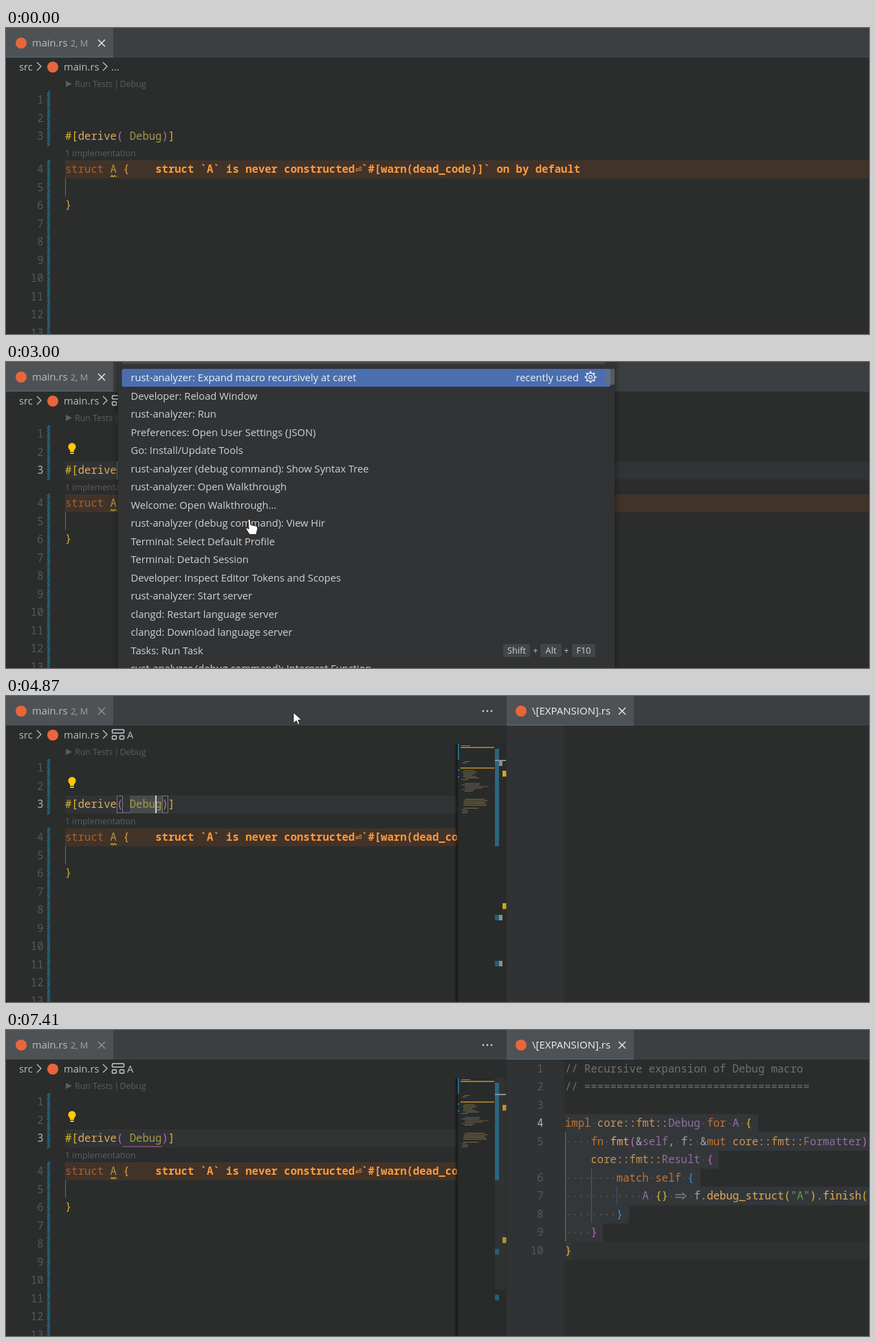
Animation of 1255 by 446 pixels, one loop 7.51 s. Source, as an HTML page with a canvas:

```html
<!DOCTYPE html>
<html lang="en">
<head>
<meta charset="utf-8">
<title>Macro expansion</title>
<style>
  html, body { margin: 0; width: 100%; height: 100%; overflow: hidden; background: #2b2d2d; }
  canvas { display: block; }
</style>
</head>
<body>
<canvas id="stage" width="1255" height="446"></canvas>
<script>
const ctx = document.getElementById('stage').getContext('2d');
const LOOP = 7510, CELL = 9.37, ROW = 26.5;
const T = { click: 1590, crumb: 1660, bulb: 1870, palette: 2920, hover: 3470, close: 4770,
            split: 4840, expand: 4910, blur: 5850, drag: 5910, leave: 6530, out: 6930, dim: 7260, inactive: 7410 };
const C = { key: '#c27332', dimKey: '#a5622f', path: '#c99557', type: '#8f6ea3', fn: '#dcaa5e', plain: '#98a4b0',
            gold: '#dcb82e', pink: '#c266c0', blue: '#3c91d8', comment: '#6f7172', string: '#6f9457',
            num: '#55595b', numOn: '#b0b3b4', ui: '#bcbfc0', olive: '#a39a45', brace: '#d9a441', warn: '#ff9a3c' };

const MOUSE = [[370, 515, 405], [1120, 222, 170], [1250, 257, 194], [1450, 219, 162], [1590, 219, 162],
  [1730, 354, 231], [3470, 354, 229], [3600, 407, 103], [3930, 409, 34], [4070, 409, 34], [4170, 418, 24],
  [5100, 418, 24], [5700, 916, 309], [5910, 916, 309], [6140, 735, 140], [6450, 735, 140], [6500, 731, 148], [6930, 590, 440]];

const PALETTE = ['rust-analyzer: Expand macro recursively at caret', 'Developer: Reload Window', 'rust-analyzer: Run',
  'Preferences: Open User Settings (JSON)', 'Go: Install/Update Tools', 'rust-analyzer (debug command): Show Syntax Tree',
  'rust-analyzer: Open Walkthrough', 'Welcome: Open Walkthrough...', 'rust-analyzer (debug command): View Hir',
  'Terminal: Select Default Profile', 'Terminal: Detach Session', 'Developer: Inspect Editor Tokens and Scopes',
  'rust-analyzer: Start server', 'clangd: Restart language server', 'clangd: Download language server',
  'Tasks: Run Task', 'rust-analyzer (debug command): Interpret Function'];

// Each row: line number, start column, then text and colour pairs.
const EXPANSION = [
  [1, 0, '// Recursive expansion of Debug macro', C.comment],
  [2, 0, '// ===================================', C.comment],
  [3, 0],
  [4, 0, 'impl ', C.key, 'core::fmt::', C.path, 'Debug ', C.type, 'for ', C.key, 'A ', C.type, '{', C.gold],
  [5, 0, '    fn ', C.key, 'fmt', C.fn, '(', C.pink, '&', C.plain, 'self', C.type, ', f: &', C.plain, 'mut ', C.key,
    'core::fmt::', C.path, 'Formatter', C.type, ')', C.pink],
  ['', 4, 'core::fmt::', C.path, 'Result ', C.type, '{', C.pink],
  [6, 0, '        match ', C.key, 'self ', C.key, '{', C.blue],
  [7, 0, '            A ', C.type, '{} ', C.gold, '=>', C.plain, ' f.', C.plain, 'debug_struct', C.fn, '(', C.gold,
    '"A"', C.string, ')', C.gold, '.', C.plain, 'finish', C.fn, '(', C.gold],
  [8, 0, '        }', C.blue],
  [9, 0, '    }', C.pink],
  [10, 0, '}', C.gold]
];
const SELECT_END = [1094, 1255, 1036, 1010, 1255, 906, 868, 822];

function rect(x, y, w, h, color, radius = 0) {
  ctx.fillStyle = color;
  ctx.beginPath();
  ctx.roundRect(x, y, w, h, radius);
  ctx.fill();
}
function line(points, color, width = 1) {
  ctx.strokeStyle = color;
  ctx.lineWidth = width;
  ctx.beginPath();
  for (let i = 0; i < points.length; i += 2) ctx.lineTo(points[i], points[i + 1]);
  ctx.stroke();
}
function dot(x, y, r, color) {
  ctx.fillStyle = color;
  ctx.beginPath();
  ctx.arc(x, y, r, 0, 7);
  ctx.fill();
}
function label(str, x, y, color = C.ui, size = 14.7, align = 'left') {
  ctx.font = `${size}px "Open Sans", sans-serif`;
  ctx.textAlign = align;
  ctx.fillStyle = color;
  ctx.fillText(str, x, y + 5);
}
function mono(str, x, y, color, align = 'left', weight = 300) {
  ctx.font = `${weight} 15.6px "Noto Sans Mono", "DejaVu Sans Mono", monospace`;
  ctx.textAlign = align;
  ctx.fillStyle = color;
  ctx.fillText(str, x, y + 5.3);
}
function code(x, y, spans, dots) {
  for (let i = 0; i < spans.length; i += 2) {
    const [str, color] = [spans[i], spans[i + 1]];
    if (str === '=>') {
      line([x + 1, y - 2, x + 14, y - 2], color);
      line([x + 1, y + 2, x + 14, y + 2], color);
      line([x + 11, y - 5, x + 17, y, x + 11, y + 5], color);
    } else mono(str, x, y, color);
    if (dots) [...str].forEach((ch, n) => ch === ' ' && rect(x + (n + .5) * CELL - 1, y - .5, 2, 2, dots, 1));
    x += str.length * CELL;
  }
}
function cross(x, y, color) {
  line([x - 5, y - 5, x + 5, y + 5], color, 1.4);
  line([x + 5, y - 5, x - 5, y + 5], color, 1.4);
}
function badge(x, y) { dot(x, y, 8, '#e8663c'); }
function gear(x, y) {
  ctx.strokeStyle = '#e3e7ee';
  ctx.lineWidth = 1.3;
  for (const r of [2.4, 6]) {
    ctx.beginPath();
    ctx.arc(x, y, r, 0, 7);
    ctx.stroke();
  }
  for (let a = 0; a < 8; a++) {
    const c = Math.cos(a * Math.PI / 4), s = Math.sin(a * Math.PI / 4);
    line([x + c * 6, y + s * 6, x + c * 8.5, y + s * 8.5], '#e3e7ee', 2.4);
  }
}

function mouseAt(t) {
  const i = MOUSE.findIndex(k => k[0] > t);
  if (i <= 0) return MOUSE[i ? MOUSE.length - 1 : 0].slice(1);
  const [t0, x0, y0] = MOUSE[i - 1], [t1, x1, y1] = MOUSE[i];
  const p = (t - t0) / (t1 - t0), e = p * p * (3 - 2 * p);
  return [x0 + (x1 - x0) * e, y0 + (y1 - y0) * e];
}

function tabsAndCrumbs(t) {
  const split = t >= T.split;
  rect(0, 0, 1255, 43, '#3c3f41');
  rect(0, 0, 156, 42, '#4e5254');
  rect(0, 42, 1255, 1, '#35454c');
  rect(0, 42, 156, 1, split ? '#3c5663' : '#3b7596');
  badge(22, 22);
  label('main.rs', 38, 22);
  label('2, M', 94, 22, '#a0a3a4', 12.8);
  cross(139, 22, split ? '#8d9192' : '#e8e8e8');

  label('src', 19, 57);
  line([45, 50, 51, 56, 45, 62], C.ui, 1.4);
  badge(68, 57);
  label('main.rs', 84, 57);
  line([141, 50, 147, 56, 141, 62], C.ui, 1.4);
  if (t < T.crumb) return label('...', 153, 57);
  ctx.strokeStyle = '#c8cacb';
  ctx.lineWidth = 1.5;
  ctx.beginPath();
  ctx.roundRect(154.5, 49, 17, 5, 1);
  ctx.roundRect(154.5, 58, 6, 5, 1);
  ctx.roundRect(165.5, 58, 6, 5, 1);
  ctx.stroke();
  label('A', 176, 57);
}

function mainEditor(t) {
  const clicked = t >= T.click, focused = clicked && t < T.blur;
  if (clicked) rect(86, 145, 1169, 26, '#313335');
  rect(86, 193, 1169, 26, '#423329');

  ctx.fillStyle = '#5c5f60';
  ctx.beginPath();
  ctx.moveTo(87, 77); ctx.lineTo(96, 81.5); ctx.lineTo(87, 86);
  ctx.fill();
  label('Run Tests', 100, 81, '#5c5f60', 12.4);
  label('|', 157.5, 81, '#5c5f60', 12.4);
  label('Debug', 165.5, 81, '#5c5f60', 12.4);
  label('1 implementation', 86, 182, '#5c5f60', 12.4);

  for (let n = 1; n <= 13; n++)
    mono(n, 54.5, n < 4 ? 105 + ROW * (n - 1) : 206 + ROW * (n - 4), n === 3 && clicked ? C.numOn : C.num, 'right');
  for (const [top, bottom] of [[92, 170], [192, 448]])
    for (let y = top; y < bottom; y += 3.2) line([60, y + 3.5, 64, y], '#1f88b0', 1.2);

  if (clicked) rect(170, 169.5, 57, 1, '#a761a8');
  if (focused) {
    if (t >= T.bulb) rect(180, 145, 47, 26, '#474c4b');
    ctx.strokeStyle = '#73786f';
    ctx.lineWidth = 1;
    ctx.strokeRect(161.5, 145.5, 8, 25);
    ctx.strokeRect(227.5, 145.5, 8, 25);
  }
  code(86, 158, ['#[', C.gold, 'derive', C.fn, '(', C.pink, ' Debug', C.olive, ')', C.pink, ']', C.gold]);
  code(86, 206, ['struct ', C.dimKey, 'A ', C.olive, '{', C.brace]);
  let x = 86 + 14 * CELL;
  for (const part of ['struct `A` is never constructed', '⏎', '`#[warn(dead_code)]` on by default']) {
    mono(part, x, 206, C.warn, 'left', 600);
    x += part.length * CELL;
  }
  line([152, 217, 154, 215, 156, 217, 158, 215, 161, 217], '#d0ae22', 1.3);
  rect(86, 219, 1, 26, '#77702a');
  mono('}', 86, 258, C.brace);

  if (t >= T.bulb) {
    dot(96, 123.5, 5.5, '#ffcc00');
    rect(93, 127, 6, 4, '#ffcc00');
    rect(93.5, 132, 5, 2, '#ffcc00');
  }
  const caret = (t >= T.click && t < 2070) || (t >= 2580 && t < T.palette) || (t >= T.close && t < T.expand);
  if (caret) rect(217, 145, 2, 26, '#c8c8c8');
}

function palette(t, my) {
  ctx.save();
  ctx.shadowColor = 'rgba(0,0,0,.45)';
  ctx.shadowBlur = 10;
  rect(163, -10, 722, 470, '#313335');
  ctx.restore();
  rect(169, 0, 702, 3, '#45494a');
  const hovered = t >= T.hover ? Math.floor((my - 10) / ROW) : 0;
  PALETTE.forEach((name, i) => {
    const y = 23 + i * ROW;
    if (i === 0 || i === hovered) {
      rect(168.5, y - 13, 710.5, 26, '#4b6eaf', 3);
      gear(850, y - 1);
    }
    label(name, 181.5, y, i === 0 ? '#eef1f6' : '#d0d2d3');
  });
  label('recently used', 833, 23, '#eef1f6', 14.7, 'right');
  rect(872, 10, 13, 23, 'rgba(105,112,122,.65)');
  for (const [key, x, w] of [['Shift', 723, 39], ['Alt', 777, 31], ['F10', 823, 34]]) {
    rect(x, 411, w, 19, '#41464a', 3);
    label(key, x + w / 2, 420, '#cfd1d2', 12.8, 'center');
  }
  for (const x of [770, 815]) label('+', x, 420, C.ui, 13, 'center');
}

function minimap(t) {
  rect(656, 70, 72, 376, '#292b2b');
  const edge = ctx.createLinearGradient(651, 0, 657, 0);
  edge.addColorStop(0, 'rgba(0,0,0,0)');
  edge.addColorStop(1, 'rgba(0,0,0,.5)');
  ctx.fillStyle = edge;
  ctx.fillRect(651, 70, 6, 376);
  rect(657, 70, 1.5, 23, '#2382aa');
  rect(662, 72, 13, 1, '#a08838');
  rect(661, 74, 49, 2, '#9c7a20');
  rect(661, 104, 49, 2, '#9c7a20');
  const random = n => Math.abs(Math.sin(n * 12.9898) * 43758.5453) % 1;
  const tones = ['#7c6a3c', '#68705e', '#74583c', '#666a6e'];
  for (const [top, bottom, width] of [[95, 99, 8], [108, 122, 20], [127, 139, 36], [150, 159, 38], [163, 171, 28]])
    for (let y = top; y < bottom; y += 2.2) {
      const indent = random(y) * 6;
      rect(662 + indent, y, 5 + random(y + 3) * (width - 5), 1, tones[Math.floor(random(y + 7) * 4)]);
    }
  for (const y of [107, 117]) rect(657, y, 2, 2, '#2382aa');

  if (t >= T.leave) rect(711, 70, 16, 308, '#303334');
  rect(711, 77, 6, 142, '#2b657f');
  for (const y of [319, 386]) rect(711, y, 6, 8, '#225f79');
  for (const y of [109, 302]) rect(722, y, 5.5, 8.5, t < T.dim ? '#d0aa12' : '#b5951a');
  rect(711, 93, 16, 2, '#8b8f90');
  if (t < T.blur) for (const y of [94, 319, 386]) rect(717, y, 5, 8, '#8a8e8f');
}

function expansionPane(t, mx, my) {
  rect(728, 43, 527, 403, '#2b2d2d');
  rect(728, 43, 84, 403, '#303234');
  rect(728, 0, 185, 42, '#4e5254');
  rect(728, 42, 185, 1, '#3b7596');
  badge(749, 22);
  label('\\[EXPANSION].rs', 765, 22, '#f0f1f2', 15);
  cross(896, 22, '#e8e8e8');
  for (let i = 0; i < 3; i++) dot(694 + i * 6, 22, 1.4, '#c8cacb');
  if (t < T.expand) return;

  const selecting = t >= T.drag, done = t >= 6140, active = t < T.inactive;
  const first = done ? 3 : Math.max(3, Math.min(10, Math.floor((my - 43.5) / ROW)));
  const startX = done ? 813 : Math.max(813, mx);
  rect(813, 308, 442, 26, '#2f3132');
  if (selecting)
    for (let i = first; i <= 10; i++) {
      const x = i === first ? startX : 813, end = SELECT_END[i - 3];
      if (x < end) rect(x, 43 + i * ROW, end - x, ROW + .5, active ? '#264f78' : '#343739', [0, 3, 3, 0]);
    }

  rect(813, 149, 1, 159, '#80742d');
  rect(851, 202, 1, 79, '#74447a');
  rect(888, 228, 1, 27, '#2c5a80');
  const current = selecting ? first : 10;
  EXPANSION.forEach(([n, column, ...spans], i) => {
    const y = 56.5 + i * ROW;
    mono(n, 781.5, y, i === current ? C.numOn : C.num, 'right');
    code(813 + column * CELL, y, spans, selecting && i >= first && (active ? '#5f7f9c' : '#585d60'));
  });
  if (active) rect(selecting ? Math.min(startX, SELECT_END[first - 3]) : 822, 43.5 + current * ROW, 2, 26, '#c8c8c8');
  if (t >= 6080 && t < T.leave) {
    dot(741, 135, 5, '#7d2222');
    for (const y of [135, 162, 215]) line([794, y - 3, 800, y + 3, 806, y - 3], '#5f6466', 1.2);
  }
}

function shape(points, x, y) {
  ctx.beginPath();
  for (let i = 0; i < points.length; i += 2) ctx.lineTo(x + points[i], y + points[i + 1]);
  ctx.closePath();
  ctx.fillStyle = '#fff';
  ctx.strokeStyle = '#222';
  ctx.lineWidth = 1;
  ctx.lineJoin = 'round';
  ctx.fill();
  ctx.stroke();
}
function pointer(t, x, y) {
  if (t < 370 || t >= T.out) return;
  const inPalette = t >= T.palette && t < T.close;
  const inGlyphs = t >= T.split && x > 728 && x < 790 && y > 43;
  if (inPalette || inGlyphs) {
    shape([-2, 0, 1, 0, 2, 8, 11, 10, 12, 13, 10, 22, 0, 22, -5, 14, -4, 12, -1, 14], x, y);
  } else if (y < 43 || (t >= T.split && x > 656 && x < 813)) {
    shape([0, 0, 0, 16, 4, 12, 7, 18, 9, 17, 7, 11, 12, 11], x, y);
  } else {
    for (const [color, width] of [['#1c1c1c', 3.6], ['#f0f0f0', 1.6]]) {
      line([x, y - 9, x, y + 9], color, width);
      for (const s of [-1, 1]) line([x - 5, y + 9 * s, x + 5, y + 9 * s], color, width);
    }
  }
}

function draw(now) {
  const t = now % LOOP, [mx, my] = mouseAt(t);
  rect(0, 0, 1255, 446, '#2b2d2d');
  tabsAndCrumbs(t);
  mainEditor(t);
  if (t >= T.palette && t < T.close) palette(t, my);
  if (t >= T.split) {
    minimap(t);
    expansionPane(t, mx, my);
  }
  pointer(t, mx, my);
}

const start = performance.now();
function tick() {
  draw(performance.now() - start);
  requestAnimationFrame(tick);
}
tick();
</script>
</body>
</html>
```
